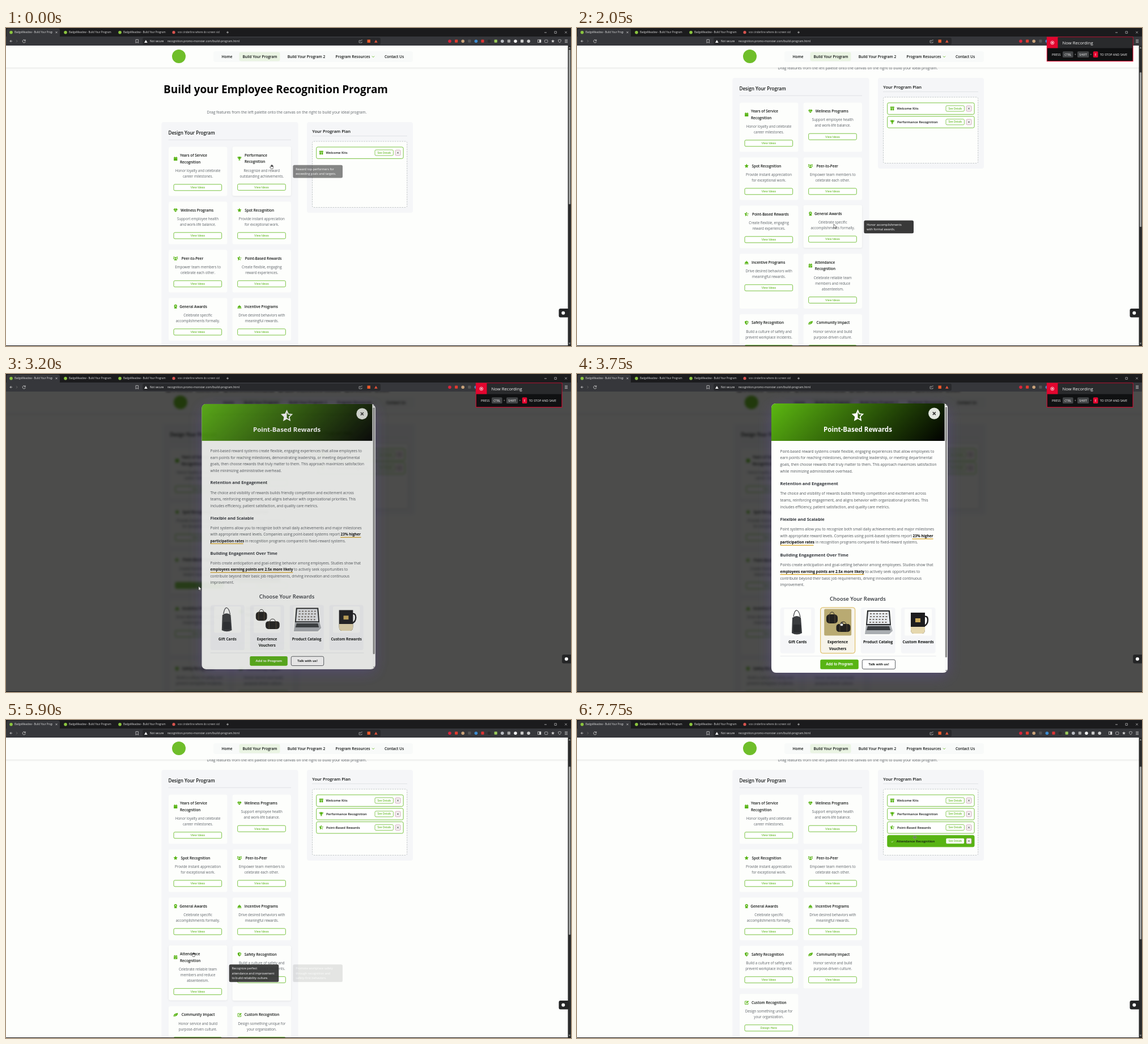
An HTML page that plays this animation: 997x561 px, repeating every 7800 ms.

```html
<!DOCTYPE html>
<html lang="en">
<head>
<meta charset="utf-8">
<title>Build Your Program</title>
<style>
html, body { margin: 0; width: 100%; height: 100%; overflow: hidden; background: #fdfefc; }
svg { display: block; font-family: "Open Sans", "Noto Sans", sans-serif; }
text { white-space: pre; }
.s { font-weight: 600; }
.b { font-weight: 700; }
.m { text-anchor: middle; }
.a { font-family: "Liberation Sans", Arial, sans-serif; }
</style>
</head>
<body>
<svg id="stage" width="997" height="561" viewBox="0 0 997 561"></svg>
<script>
const GREEN = '#58b414', INK = '#111413', GREY = '#5d6268', PANEL = '#f5f6f8', WHITE = '#fdfefc';
const LOOP = 7800;

// Markup helpers; text is placed by the middle of its capitals
const text = (x, y, s, size, fill = INK, cls = '') =>
  `<text x="${x}" y="${(y + size * .36).toFixed(2)}" font-size="${size}" fill="${fill}" class="${cls}">${s}</text>`;
const rect = (x, y, w, h, fill, r = 0, extra = '') =>
  `<rect x="${x}" y="${y}" width="${w}" height="${h}" fill="${fill}" rx="${r}" ${extra}/>`;
const dot = (x, y, r, fill) => `<circle cx="${x}" cy="${y}" r="${r}" fill="${fill}"/>`;
const path = (d, fill = 'none', stroke = 'none', w = 1, extra = '') =>
  `<path d="${d}" fill="${fill}" stroke="${stroke}" stroke-width="${w}" ${extra}/>`;
const group = (id, body, extra = '') => `<g id="${id}" ${extra}>${body}</g>`;
const at = (x, y, body, k = 1) => `<g transform="translate(${x} ${y}) scale(${k})">${body}</g>`;
const outline = (color, w = .8) => `stroke="${color}" stroke-width="${w}"`;
const cross = (x, y, r, color, w) =>
  path(`M${x - r} ${y - r}l${2 * r} ${2 * r}M${x + r} ${y - r}l${-2 * r} ${2 * r}`, 'none', color, w);

const starPath = (r, from = 0, to = 10) => {
  let d = '';
  for (let i = from; i <= to; i++) {
    const a = i * Math.PI / 5, q = i % 2 ? r * .48 : r;
    d += (d ? 'L' : 'M') + (Math.sin(a) * q).toFixed(2) + ' ' + (-Math.cos(a) * q).toFixed(2);
  }
  return d + 'z';
};
const halfStar = (r, c) => path(starPath(r, 5, 10), c) + path(starPath(r * .9), 'none', c, r * .17);
const calendar = path('M-3.4-3h6.8v1.6h-6.8zM-3.4-.9h6.8v4.5h-6.8zM-2.2-4h1v1h-1zM1.2-4h1v1h-1z', GREEN);
const icons = {
  calendar,
  check: calendar + path('M-1.6 1.2l1.2 1.2 2-2.2', 'none', '#fff', .8),
  trophy: path('M-2.2-3.6h4.4v3a2.2 2.2 0 0 1-1.6 2.1v1.1h1v1h-3.2v-1h1v-1.1a2.2 2.2 0 0 1-1.6-2.1z', GREEN) +
    path('M-2-2.6h-1.7q.2 2.4 2 2.6M2-2.6h1.7q-.2 2.4-2 2.6', 'none', GREEN, .8),
  heart: path('M0 3.5L-3.3.2A2.1 2.1 0 0 1 0-2.5 2.1 2.1 0 0 1 3.3.2z', GREEN) +
    path('M-4 .1h2.4l.9-1.4 1.3 2.4.7-1H4', 'none', '#fff', .6),
  star: path(starPath(4.3), GREEN),
  users: dot(-3, -2.3, 1.1, GREEN) + dot(3, -2.3, 1.1, GREEN) + dot(0, -1.2, 1.4, GREEN) +
    path('M-2.8 3.6q0-2.8 2.8-2.8t2.8 2.8zM-4.8 1q0-1.8 3-1.6l-1 1.6zM4.8 1q0-1.8-3-1.6l1 1.6z', GREEN),
  half: halfStar(4.3, GREEN),
  award: path('M-2 .8L-2.6 4-.9 3.3 0 4.2.9 3.3 2.6 4 2 .8z', GREEN) + dot(0, -1.2, 2.8, GREEN) + dot(0, -1.2, 1.1, '#fff'),
  bell: path('M-3.8 2.2h7.6v1.2h-7.6zM-3.3 1.6a3.3 3.3 0 0 1 6.6 0zM-.7-2.9h1.4v1h-1.4z', GREEN),
  shield: path('M0-4l3.4 1.3Q3.6 2 0 4-3.6 2-3.4-2.7z', GREEN) + path('M.2-2.6L2-1.9Q2 1 .2 2.4z', '#fff'),
  leaf: path('M-4 3.2Q-4.2-1.4.4-2.6L4.4-3.6Q4.4 1.2 1 2.4T-4 3.2z', GREEN) + path('M-3.4 2.4L1.6-.8', 'none', '#fff', .6),
  pen: path('M1-2.6h-4v6h6v-3', 'none', GREEN, 1) + path('M-1 1.6l.4-1.8 3.4-3.4 1.4 1.4L.8 1.2z', GREEN),
  gift: path('M-3.7-3.4h7.4v2.2h-7.4zM-3.2-.7h2.8v4.2h-2.8zM.4-.7h2.8v4.2H.4z', GREEN)
};

// icon, text offset, title, description, tooltip, button
const cards = {
  years: ['calendar', 20, 'Years of Service|Recognition', 'Honor loyalty and celebrate|career milestones.', 'Celebrate loyalty and|career milestones.'],
  perform: ['trophy', 21.3, 'Performance|Recognition', 'Recognize and reward|outstanding achievements.', 'Reward top performers for|exceeding goals and targets.'],
  wellness: ['heart', 21, 'Wellness Programs', 'Support employee health|and work-life balance.', 'Promote a healthy and|balanced workplace.'],
  spot: ['star', 21.5, 'Spot Recognition', 'Provide instant appreciation|for exceptional work.', 'Reward great work|in the moment.'],
  peer: ['users', 22.7, 'Peer-to-Peer', 'Empower team members to|celebrate each other.', 'Let colleagues celebrate|one another.'],
  point: ['half', 22, 'Point-Based Rewards', 'Create flexible, engaging|reward experiences.', 'Employees earn points to|redeem for rewards of|their own choosing.'],
  general: ['award', 19.3, 'General Awards', 'Celebrate specific|accomplishments formally.', 'Honor accomplishments|with formal awards.'],
  incentive: ['bell', 21, 'Incentive Programs', 'Drive desired behaviors with|meaningful rewards.', 'Motivate teams with|meaningful rewards.'],
  attend: ['check', 20, 'Attendance|Recognition', 'Celebrate reliable team|members and reduce|absenteeism.', 'Recognize perfect|attendance and improvement|to build reliability culture.'],
  safety: ['shield', 21, 'Safety Recognition', 'Build a culture of safety and|prevent workplace incidents.', 'Promote workplace safety|through recognition and|safety-first behaviors.'],
  impact: ['leaf', 22.7, 'Community Impact', 'Honor service and build|purpose-driven culture.', 'Celebrate volunteering|and service.'],
  custom: ['pen', 21, 'Custom Recognition', 'Design something unique for|your organization.', 'Create a custom recognition|program tailored to your|unique needs.', 'Design Here']
};
const names = Object.keys(cards);
const lines = (name, i) => cards[name][i].split('|');
const cardHeight = name => 75.2 + 11.6 * (lines(name, 2).length - 1) + 10 * (lines(name, 3).length - 2);

function button(x, y, w, label) {
  return rect(x, y, w, 11, '#fff', 2, outline(GREEN)) + text(x + w / 2, y + 5.5, label, 5.3, GREEN, 'a m');
}
function cardBody(name) {
  const [icon, tx, , , , label = 'View Ideas'] = cards[name];
  const title = lines(name, 2), desc = lines(name, 3);
  const extra = 11.6 * (title.length - 1);
  return rect(0, 0, 103.3, cardHeight(name), WHITE, 3) +
    at(12.2, 15.2 + extra / 2, icons[icon], .92) +
    title.map((s, i) => text(tx, 15.2 + 11.6 * i, s, 6.36, INK, 's')).join('') +
    desc.map((s, i) => text(51.6, 30.5 + extra + 10 * i, s, 6.2, GREY, 'm')).join('') +
    button(9, cardHeight(name) - 20.7, 84.6, label);
}
function tipBody(name) {
  const l = lines(name, 4), h = 5.8 + 8.4 * l.length;
  return rect(0, -h / 2, 87.6, h, '#333', 2.5) +
    l.map((s, i) => text(4.8, (i - (l.length - 1) / 2) * 8.4, s, 5.42, '#fff')).join('');
}
const plan = [['gift', 'Welcome Kits', 564.6], ['trophy', 'Performance Recognition', 565],
  ['half', 'Point-Based Rewards', 565], ['check', 'Attendance Recognition', 563.8]];
const planItem = ([icon, label, x], i) => group('item' + i,
  rect(547.7, 210, 153.4, 20.4, '#fff', 2.5, `class="box" ${outline(GREEN)}`) + at(556.3, 220, icons[icon], .95) +
  text(x, 220, label, 5.86, INK, 's') +
  rect(651, 215, 32.4, 10, '#fff', 2, outline(GREEN, .7)) + text(667.2, 220, 'See Details', 4.7, GREEN, 'a m') +
  rect(687, 215.4, 9, 9.4, '#fbf7f9', 1.5, outline('#b9879b', .7)) + cross(691.5, 220.1, 1.8, '#444', .8),
  `transform="translate(0 ${23.8 * i})"`);

function chrome() {
  let s = rect(0, 0, 997, 15, '#1b1b1d') + rect(0, 15, 997, 16, '#36373b') + rect(1, 1, 94, 16, '#36373b', 3) +
    rect(241, 17, 420, 12.5, '#28292c', 3);
  const tab = 'BadgeMeadow - Build Your Program';
  [9, 105, 201].forEach((x, i) => s += dot(x, 7.7, 2.8, '#8cc63f') +
    `<g ${i ? '' : 'clip-path="url(#tab1)"'}>${text(x + 6, 7.7, tab, 4.45, '#dcdcdc')}</g>`);
  s += dot(296, 7.7, 2.6, '#d8544f') + `<g clip-path="url(#tab4)">${text(303, 7.7, 'vox cinderline where do screen sid', 4.6, '#c8c8c8')}</g>` +
    cross(89, 7.7, 1.5, '#ddd', .7) + path('M389 7.7h4M391 5.7v4M950 8h4', 'none', '#ddd', .7) +
    rect(968, 6, 3.6, 3.6, 'none', 0, outline('#ddd', .6)) + cross(988, 7.7, 1.8, '#ddd', .6) +
    path('M11 23.2H7m2-2l-2 2 2 2', 'none', '#ddd', .8) + path('M18 21.2l2 2-2 2', 'none', '#777', .8) +
    path('M34 22a2.6 2.6 0 1 0 .3 2M34.2 20.4v2h-2', 'none', '#ddd', .8) +
    path('M229 20.4h4.4v6l-2.2-1.6-2.2 1.6z', 'none', '#ddd', .7) + path('M244 26l2.8-5 2.8 5z', '#eee') +
    text(254, 23.3, 'Not secure', 4.8, '#eee') +
    text(284.7, 23.3, 'recognition.promo-monster.com/build-program.html', 5.17, '#e4e4e4') +
    path('M625 22h-2v4h5v-2M625 24q0-3 4-3', 'none', '#bbb', .7) +
    rect(637.5, 20.5, 5.4, 5.4, '#ee5a2b') + path('M650 25.7l2.8-5 2.8 5z', '#e0523a');
  const tints = ['#d8243c', '#e23b2e', '#c9a27a', '#555', '#3c8bd0', '#d33', '#2b2b2b', '#9acb5a', '#b9bcc2', '#a6a6a6', '#eee', '#ccc', '#ccc'];
  tints.forEach((c, i) => s += i % 2 ? rect(792 + (i - 1) * 11.6, 20.6, 5.2, 5.2, c, 1) : dot(783 + i * 11.6, 23.2, 2.8, c));
  s += rect(938.5, 20.8, 5.4, 4.8, 'none', 0, outline('#ddd', .7)) + rect(941, 20.8, 3, 4.8, '#ddd') +
    rect(950.5, 21, 5.4, 4.6, 'none', 1, outline('#ccc', .7)) + at(965, 23.2, path(starPath(3), '#ccc')) +
    path('M974.5 21l2.5-.8 2.5.8q0 4-2.5 5-2.5-1-2.5-5z', 'none', '#ccc', .7) +
    path('M986 21h5M986 23.2h5M986 25.4h5', 'none', '#ddd', .8);
  return s;
}

function header() {
  const nav = [['Home', 390], ['Build Your Program', 448], ['Build Your Program 2', 530], ['Program Resources', 612], ['Contact Us', 685]];
  return rect(-10, 31, 1020, 38.5, WHITE, 0, 'filter="url(#soft)"') + dot(305, 50, 12, '#6fbe2a') +
    rect(366, 41, 352, 19, '#f8faf9', 4) + rect(411.5, 42.5, 72, 16, '#eaf4e3', 3) +
    nav.map(([s, x]) => text(x, 50.5, s, 6.54, INK, 's m')).join('') +
    path('M646 49.6l2 2 2-2', 'none', GREEN, .9);
}

function body() {
  return text(476, 108.5, 'Build your Employee Recognition Program', 18.92, '#050505', 'b m') +
    text(495.5, 148.3, 'Drag features from the left palette onto the canvas on the right to build your ideal program.', 6.64, GREY, 'm') +
    rect(274.3, 166, 241.3, 1000, PANEL, 4) + rect(531, 166, 187, 160, PANEL, 4) +
    text(286.5, 185, 'Design Your Program', 8.12, INK, 's') + text(540.3, 181.8, 'Your Program Plan', 7.55, INK, 's') +
    path('M286.5 197.3h216.5M540 190.5h168', 'none', '#dcdfe2', .8) +
    rect(540.5, 200, 167.2, 116.5, WHITE, 2.5, 'id="zone" stroke-width=".9" stroke-dasharray="2.6 1.6"') +
    plan.map(planItem).join('') +
    names.map(n => group('card-' + n, cardBody(n))).join('') +
    names.map(n => group('tip-' + n, tipBody(n))).join('');
}

function recording() {
  const red = '#e3062f';
  const key = (x, w, s, fill) => rect(x, 41.3, w, 10.8, fill, 1.5) + text(x + w / 2, 46.7, s, 5.2, '#fff', 'm');
  return rect(829.3, 16, 151.7, 42.6, '#101112', 0, outline(red, 1)) + rect(848.5, 16.5, 132, 19, '#292a2c') +
    rect(829.3, 16, 19.2, 19.5, red) + `<circle cx="838.8" cy="26" r="2.9" fill="none" ${outline('#fff')}/>` + dot(838.8, 26, 1.3, '#fff') +
    text(856.4, 26.3, 'Now Recording', 7.7, '#f2f2f2') +
    text(838, 46.7, 'PRESS', 5.4, '#fff') + key(857, 18.6, 'CTRL', '#434547') + text(879.3, 46.7, '+', 5, '#ccc', 'm') +
    key(883, 20.3, 'SHIFT', '#434547') + text(907, 46.7, '+', 5, '#ccc', 'm') + key(910.8, 8.6, 'E', red) +
    text(922.7, 46.7, 'TO STOP AND SAVE', 5.4, '#fff');
}

const duffel = (x, y, w, h) =>
  path(`M${x + w * .3} ${y + 2}q0-6 ${w * .2}-6t${w * .2} 6`, 'none', '#23211f', 1) + rect(x, y, w, h, '#23211f', h * .35) +
  path(`M${x + w * .25} ${y}v${h}M${x + w * .75} ${y}v${h}`, 'none', '#6a5a40', .7);

function goods() {
  return path('M382 428q2-12 6-11t6 12', 'none', '#3a3c3f', 1.2) +
    path('M380 430q8-6 15 0l2 27q-9 5-18 0z', '#3a3c3f') + rect(381.5, 442, 13, 14, '#2a2c2f', 2) +
    duffel(440, 424, 20, 16) + duffel(457.5, 441, 25, 14) +
    path('M512 417h40l2 26h-44z', '#26282a') + path('M514 419h36l2 22h-40z', '#e9ecef') +
    path('M517 423h31M517 428h31M516 433h33M516 438h33', 'none', '#77706a', 2, 'stroke-dasharray="3 2.5"') +
    path('M510 443h44l3 10-6 6h-43z', '#a9adb1') + path('M513 445h38l2 7h-42z', '#3a3d40') +
    path('M612 428q7-2 7 6t-7 11', 'none', '#1d1d1f', 2.4) +
    path('M589 421h25v30q0 7-5 7h-15q-5 0-5-7z', '#1d1d1f') + path('M589 446h25v5q0 7-5 7h-15q-5 0-5-7z', '#e6d8ae') +
    rect(597, 431, 9, 7, '#c9a95a');
}

function modal() {
  const strong = s => `<tspan class="b" fill="#0a0a0a">${s}</tspan>`;
  const para = (y, ...rows) => rows.map((s, i) => text(358.5, y + 11.65 * i, s, 6.5, '#50555a')).join('');
  const head = (y, s) => text(358.5, y, s, 7.55, '#30343a', 'b');
  const labels = ['Gift Cards', 'Experience|Vouchers', 'Product Catalog', 'Custom Rewards'];
  const tiles = labels.map((label, i) => {
    const x = 358.7 + 71 * i;
    return rect(x, 412, 61, 80.7, PANEL, 4) +
      (i === 1 ? group('tileHot', rect(x, 412, 61, 80.7, '#f7f4ea', 4, outline('#d9b34e', 1))) : '') +
      rect(x + 6.5, 414.5, 48, 47, WHITE, 2) +
      (i === 1 ? group('tileTint', rect(x + 6.5, 414.5, 48, 47, '#b9aa72', 2)) : '') +
      label.split('|').map((s, j) => text(x + 30.4, 472.7 + 11.7 * j, s, 6.6, INK, 'b m')).join('');
  }).join('');
  return rect(343, 58, 311, 475, '#6a4fd0', 8, 'opacity=".3" filter="url(#glow)"') +
    `<g clip-path="url(#frame)">` + rect(343, 52, 311, 475, WHITE) + rect(343, 52, 306, 66, 'url(#banner)') +
    rect(648.7, 52, 6, 475, '#fafbfa') + rect(649.8, 58, 3.2, 442, '#8b8b8b', 1.6) +
    path('M650 56l1.5-2 1.5 2zM650 522.5l1.5 2 1.5-2z', '#666') + `</g>` +
    at(495.5, 73.7, halfStar(10.3, '#fff')) + text(495.5, 97.5, 'Point-Based Rewards', 11.54, '#fff', 'b m') +
    dot(630.3, 69.6, 10.2, '#e3e7e0') + cross(630.3, 69.6, 2.5, '#333', 1.5) +
    para(136.3, 'Point-based reward systems create flexible, engaging experiences that allow employees to',
      'earn points for reaching milestones, demonstrating leadership, or meeting departmental',
      'goals, then choose rewards that truly matter to them. This approach maximizes satisfaction',
      'while minimizing administrative overhead.') +
    head(193, 'Retention and Engagement') +
    para(211, 'The choice and visibility of rewards builds friendly competition and excitement across',
      'teams, reinforcing engagement, and aligns behavior with organizational priorities. This',
      'includes efficiency, patient satisfaction, and quality care metrics.') +
    head(256.2, 'Flexible and Scalable') +
    para(273.8, 'Point systems allow you to recognize both small daily achievements and major milestones',
      'with appropriate reward levels. Companies using point-based systems report ' + strong('23% higher'),
      strong('participation rates') + ' in recognition programs compared to fixed-reward systems.') +
    head(319.3, 'Building Engagement Over Time') +
    para(337, 'Points create anticipation and goal-setting behavior among employees. Studies show that',
      strong('employees earning points are 2.5x more likely') + ' to actively seek opportunities to',
      'contribute beyond their basic job requirements, driving innovation and continuous', 'improvement.') +
    path('M591.5 290.8h37M358.5 302.2h59M358.5 353.7h148', 'none', '#d9a420', 1.2) +
    text(495.5, 397, 'Choose Your Rewards', 9.5, '#30343a', 's m') + tiles + goods() +
    path('M358.5 497.7h275', 'none', '#e2e4e6', .8) +
    rect(429.3, 503.7, 67.5, 17, GREEN, 2.5, 'id="addBox"') + text(463, 512, 'Add to Program', 6.3, '#fff', 'a b m') +
    rect(503.3, 504, 58.3, 16.5, '#fff', 2.5, outline('#30343a')) + text(532.5, 512, 'Talk with us!', 6.1, INK, 'a b m');
}

const cursors = {
  arrow: path('M-2-4v7.4l1.7-1.6 1.1 2.5 1.2-.5-1.1-2.4h2.3z', '#fff', '#222', .6),
  hand: path('M-1.6 3.4L-3.5.3l.9-.5 1 .8V-2.6h1v2.2-3h1v3-2.6h1v3-1.8h1V1.6L2 3.4z', '#fff', '#222', .6),
  move: path('M0-4l1.4 1.6H.5v1.9h1.9v-.9L4 0 2.4 1.4V.5H.5v1.9h.9L0 4-1.4 2.4h.9V.5h-1.9v.9L-4 0l1.6-1.4v.9h1.9v-1.9h-.9z', '#333', '#eee', .3)
};
const clip = (id, x, y, w, h, r = 0) => `<clipPath id="${id}">${rect(x, y, w, h, '#000', r)}</clipPath>`;

document.getElementById('stage').innerHTML = `<defs>
  ${clip('view', 0, 31, 997, 529)}${clip('tab1', 0, 0, 82, 15)}${clip('tab4', 300, 0, 78, 15)}${clip('frame', 343, 52, 311, 475, 8)}
  <linearGradient id="banner" gradientUnits="userSpaceOnUse" x1="403" y1="-8" x2="589" y2="178">
    <stop offset="0" stop-color="#5cb811"/><stop offset="1"/></linearGradient>
  <filter id="soft" x="-5%" y="-20%" width="110%" height="150%"><feDropShadow dx="0" dy="1" stdDeviation="1.5" flood-opacity=".13"/></filter>
  <filter id="lift" x="-20%" y="-20%" width="140%" height="150%"><feDropShadow dx="0" dy="1" stdDeviation="1.5" flood-opacity=".07"/></filter>
  <filter id="glow" x="-30%" y="-30%" width="160%" height="160%"><feGaussianBlur stdDeviation="13"/></filter></defs>` +
  rect(0, 0, 997, 561, WHITE) +
  `<g clip-path="url(#view)">` + group('page', group('scroll', body()) + header()) +
  group('bar', rect(991.5, 31, 6, 530, '#2b2c2c') + rect(993, 38, 3, 273, '#a0a2a0', 1.5, 'id="thumb"') +
    path('M992.7 36l1.7-2.4 1.7 2.4zM992.7 555.5l1.7 2.4 1.7-2.4z', '#a0a2a0')) +
  group('ghost-perform', cardBody('perform')) + group('ghost-attend', cardBody('attend')) +
  group('shade', rect(0, 31, 997, 530, '#000', 0, 'opacity=".7"')) + group('modal', modal()) +
  group('widget', rect(975.5, 495, 18, 15.5, '#242526', 3) + dot(983.3, 502.7, 3, '#fff')) + `</g>` +
  rect(0, 560, 997, 1, '#151516') + chrome() + group('recording', recording()) +
  Object.keys(cursors).map(k => group('cur-' + k, cursors[k])).join('');

const el = {};
document.querySelectorAll('[id]').forEach(e => el[e.id] = e);
const move = (id, x, y) => el[id].setAttribute('transform', `translate(${x.toFixed(2)} ${y.toFixed(2)})`);
const fade = (id, o) => {
  el[id].style.display = o > 0 ? '' : 'none';
  el[id].style.opacity = o;
};
const clamp = v => Math.max(0, Math.min(1, v));
const ramp = (t, a, b) => clamp((t - a) / (b - a));
const smooth = v => v * v * (3 - 2 * v);
const pulse = (t, a, b, d = 200) => ramp(t, a, a + d) * (1 - ramp(t, b, b + d));
const mix = (a, b, k) => `rgb(${a.map((v, i) => Math.round(v + (b[i] - v) * k))})`;

const DROP1 = 1200, OPEN = 2985, ADD = 4600, CLOSED = 4800, DROP2 = 7350;
const route = [[0, 469, 245], [500, 469, 245], [1120, 595, 265], [1300, 595, 265], [2050, 455, 350], [2100, 455, 350],
  [2600, 339, 377], [3150, 339, 377], [3720, 467, 441], [3800, 467, 441], [4350, 463, 510], [4600, 463, 510],
  [4900, 463, 504], [5400, 463, 504], [5600, 452, 452], [5870, 331, 414], [6200, 331, 414], [6950, 596, 207], [LOOP, 596, 207]];
const kinds = [[0, 'hand'], [500, 'arrow'], [3500, 'hand'], [4600, 'arrow'], [5500, 'hand'], [6250, 'arrow'], [DROP2, 'move']];
const hovers = { perform: [-120, 450], general: [1850, 2250], point: [2350, 3100], custom: [4620, 5430], safety: [5450, 5725], attend: [5710, 6200] };

function cursorAt(t) {
  const i = Math.max(1, route.findIndex(p => p[0] > t));
  const [a, x, y] = route[i - 1], [b, u, v] = route[i], k = smooth(ramp(t, a, b));
  return [x + (u - x) * k, y + (v - y) * k];
}

function layout(t) {
  const gone = { perform: DROP1, point: ADD, attend: DROP2 };
  const list = names.filter(n => !(t >= gone[n])), place = {};
  for (let i = 0, y = 209.7; i < list.length; i += 2) {
    const row = list.slice(i, i + 2), h = Math.max(...row.map(cardHeight));
    row.forEach((n, c) => place[n] = { x: 287 + 112.7 * c, y, h });
    y += h + 9.8;
  }
  return place;
}

function draw(t) {
  const open = t >= OPEN && t < CLOSED, shift = open ? 2.8 : 0;
  const scroll = 78 * smooth(ramp(t, 1400, 1850)), place = layout(t);
  const [cx, cy] = cursorAt(t);
  move('page', shift, 0);
  move('scroll', 0, -scroll);
  el.page.style.filter = open ? 'blur(2px)' : '';

  const dragging = { perform: t >= 500 && t < DROP1, attend: t >= 6200 && t < DROP2 };
  for (const n of names) {
    const p = place[n], [a, b] = hovers[n] || [1e5, 1e5], hot = p ? pulse(t, a, b) : 0;
    fade('card-' + n, p ? (dragging[n] ? .5 : 1) : 0);
    fade('tip-' + n, hot * .97);
    if (!p) continue;
    move('card-' + n, p.x, p.y - hot * .8);
    move('tip-' + n, p.x + 106.7, p.y + p.h / 2);
    const box = el['card-' + n].firstChild;
    box.setAttribute('height', p.h);
    box.setAttribute('filter', hot > 0 ? 'url(#lift)' : 'none');
  }
  const ideas = [...el['card-point'].querySelectorAll('rect')].pop();
  ideas.setAttribute('fill', mix([255, 255, 255], [88, 180, 20], pulse(t, 2450, 3150)));

  [['perform', 69, 35], ['attend', 44, 15]].forEach(([n, dx, dy]) => {
    fade('ghost-' + n, dragging[n] ? .65 : 0);
    move('ghost-' + n, cx - dx, cy - dy);
  });
  [0, DROP1, ADD, DROP2].forEach((s, i) => fade('item' + i, t >= s ? 1 : 0));
  el.item3.querySelector('.box').setAttribute('fill', mix([255, 255, 255], [88, 180, 20], ramp(t, DROP2, 7600)));
  const over = Math.max(pulse(t, 850, 1250), pulse(t, 6750, DROP2));
  el.zone.setAttribute('stroke', mix([190, 195, 198], [110, 175, 70], over));

  fade('bar', open ? 0 : 1);
  const [step, len] = t < ADD ? [40, 273] : [44, t < DROP2 ? 297 : 305];
  el.thumb.setAttribute('y', 38 + step * scroll / 78);
  el.thumb.setAttribute('height', len);

  const leave = 1 - ramp(t, ADD, CLOSED), q = ramp(t, OPEN, 3335), e = 1 - (1 - q) * (1 - q), k = .9 + .1 * e;
  fade('shade', open ? leave : 0);
  fade('modal', open ? e * leave : 0);
  el.modal.setAttribute('transform', `translate(498.5 ${289.5 - 18 * (1 - e)}) scale(${k}) translate(-498.5 -289.5)`);
  const tile = pulse(t, 3500, 3980);
  fade('tileHot', tile);
  fade('tileTint', tile);
  el.addBox.setAttribute('fill', mix([88, 180, 20], [70, 150, 14], ramp(t, 4200, 4350)));
  move('widget', open ? 5.6 : 0, 0);
  fade('recording', pulse(t, 75, 5450, 225));

  const kind = kinds.filter(c => c[0] <= t).pop()[1];
  for (const c in cursors) fade('cur-' + c, c === kind ? 1 : 0);
  move('cur-' + kind, cx, cy);
}

const start = performance.now();
function tick() {
  draw((performance.now() - start) % LOOP);
  requestAnimationFrame(tick);
}
tick();
</script>
</body>
</html>
```
